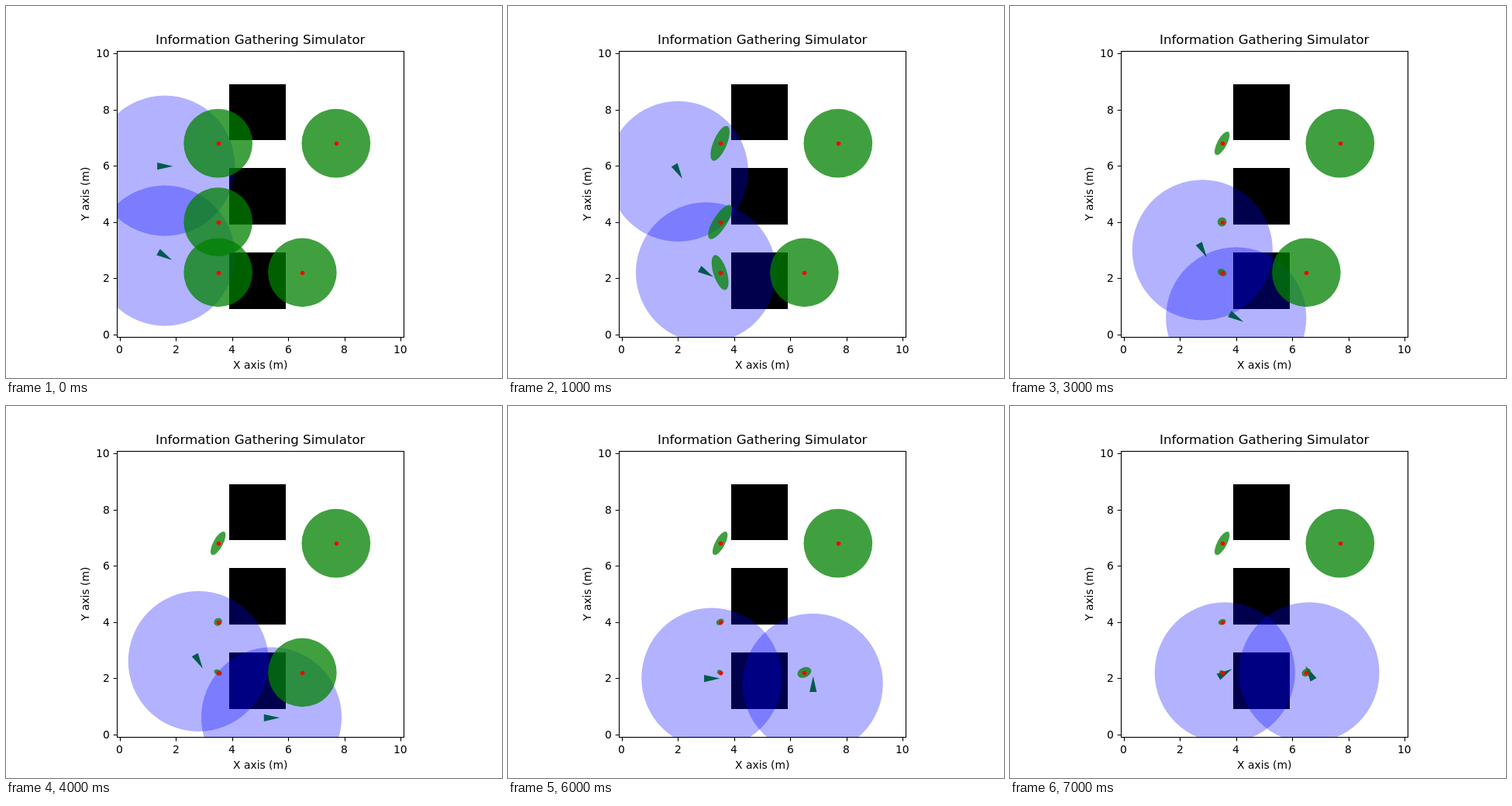
Write an HTML page with a canvas that moves like this. It is 640 px wide and 480 px high and loops after 8 s.

```html
<!DOCTYPE html>
<html lang="en">
<head>
<meta charset="utf-8">
<title>Information Gathering Simulator</title>
<style>
html, body { margin: 0; width: 100%; height: 100%; overflow: hidden; background: #fff; }
canvas { display: block; }
</style>
</head>
<body>
<canvas id="stage" width="640" height="480"></canvas>
<script>
const ctx = document.getElementById('stage').getContext('2d');
const STEP = 1000, STEPS = 8;
const SCALE = 369.6 / 10.2;
const SENSOR_RANGE = 2.5;
const PRIOR_SIGMA = 0.5, RANGE_SIGMA = 0.1, BEARING_SIGMA = Math.PI / 20;
const CONFIDENCE = 2.4477; // 95 % ellipse, in standard deviations

const px = x => 143.2 + (x + 0.1) * SCALE;
const py = y => 427.2 - (y + 0.1) * SCALE;
const snap = v => Math.round(v) + 0.5;

// Robot waypoints, one per step: x, y, heading in degrees
const robots = [
  [[1.6, 6, 0], [2, 5.8, -60], [2.4, 4.4, -90], [2.8, 3, -60],
   [2.8, 2.6, -60], [2.8, 2.2, -60], [3.2, 2, 0], [3.6, 2.2, 30]],
  [[1.6, 2.8, -30], [3, 2.2, -30], [3.8, 1, -90], [4, 0.6, -30],
   [5.4, 0.6, 0], [6.6, 1.4, 30], [6.8, 1.8, 90], [6.6, 2.2, 120]]
];
const targets = [[3.5, 6.8], [3.5, 4], [3.5, 2.2], [6.5, 2.2], [7.7, 6.8]];

// Fuses all range and bearing readings taken before the step; returns semi-axes and tilt
function uncertainty([x, y], step) {
  let xx = PRIOR_SIGMA ** -2, yy = xx, xy = 0;
  for (const waypoints of robots) {
    for (const [rx, ry] of waypoints.slice(0, step)) {
      const dist = Math.hypot(x - rx, y - ry);
      if (dist > SENSOR_RANGE) continue;
      const c = (x - rx) / dist, s = (y - ry) / dist;
      const along = RANGE_SIGMA ** -2, across = (BEARING_SIGMA * dist) ** -2;
      xx += along * c * c + across * s * s;
      yy += along * s * s + across * c * c;
      xy += (along - across) * c * s;
    }
  }
  const mean = (xx + yy) / 2, spread = Math.hypot((xx - yy) / 2, xy);
  const axis = info => CONFIDENCE * SCALE / Math.sqrt(info);
  return [axis(mean + spread), axis(mean - spread), Math.atan2(2 * xy, xx - yy) / 2];
}

function ellipse(x, y, a, b, tilt, color) {
  ctx.fillStyle = color;
  ctx.beginPath();
  ctx.ellipse(x, y, a, b, tilt, 0, 2 * Math.PI);
  ctx.fill();
}

function drawRobot([x, y, heading]) {
  const radius = SENSOR_RANGE * SCALE;
  ctx.save();
  ctx.translate(px(x) + 0.5, py(y) + 0.5);
  ctx.rotate(-heading * Math.PI / 180);
  ctx.fillStyle = 'green';
  ctx.beginPath();
  ctx.moveTo(10.2, 0);
  ctx.lineTo(-10.2, -4.6);
  ctx.lineTo(-10.2, 4.6);
  ctx.fill();
  ctx.restore();
  ellipse(px(x), py(y), radius, radius, 0, 'rgba(0,0,255,0.3)');
}

// anchor: 0.5 centres the text on x, 1 ends it there
function text(string, x, y, anchor = 0.5, size = 13.89) {
  ctx.font = `${size}px "DejaVu Sans", sans-serif`;
  const left = x - ctx.measureText(string).width * anchor;
  ctx.fillText(string, Math.round(left), Math.round(y));
}

function drawAxes() {
  ctx.fillStyle = ctx.strokeStyle = '#000';
  ctx.lineWidth = 1.11;
  ctx.strokeRect(143.5, 58.5, 370, 369);
  ctx.beginPath();
  for (let v = 0; v <= 10; v += 2) {
    ctx.moveTo(snap(px(v)), 427.5);
    ctx.lineTo(snap(px(v)), 432.4);
    ctx.moveTo(143.5, snap(py(v)));
    ctx.lineTo(138.6, snap(py(v)));
    text(v, px(v), 448);
    text(v, 133.5, py(v) + 5, 1);
  }
  ctx.stroke();
  text('Information Gathering Simulator', 328, 49, 0.5, 16.67);
  text('X axis (m)', 328, 468);
  ctx.save();
  ctx.translate(107, 242);
  ctx.rotate(-Math.PI / 2);
  text('Y axis (m)', 0, 0);
  ctx.restore();
}

function drawObstacles() {
  const left = Math.round(px(3.9)), right = Math.round(px(5.9));
  ctx.fillStyle = '#000';
  for (let y = 0.9; y < 7; y += 3) {
    const top = Math.round(py(y + 2) - 0.4), bottom = Math.round(py(y) - 0.4);
    ctx.fillRect(left, top, right - left, bottom - top);
  }
}

function draw(step) {
  ctx.fillStyle = '#fff';
  ctx.fillRect(0, 0, 640, 480);
  ctx.save();
  ctx.beginPath();
  ctx.rect(143.2, 57.6, 369.6, 369.6);
  ctx.clip();
  drawObstacles();
  for (const waypoints of robots) drawRobot(waypoints[step]);
  for (const target of targets) {
    const [x, y] = target;
    ellipse(px(x), py(y), ...uncertainty(target, step), 'rgba(0,128,0,0.75)');
  }
  for (const [x, y] of targets) ellipse(snap(px(x)), snap(py(y)), 2.78, 2.78, 0, 'red');
  ctx.restore();
  drawAxes();
}

function tick() {
  draw(Math.floor(performance.now() / STEP) % STEPS);
  requestAnimationFrame(tick);
}
tick();
</script>
</body>
</html>
```
